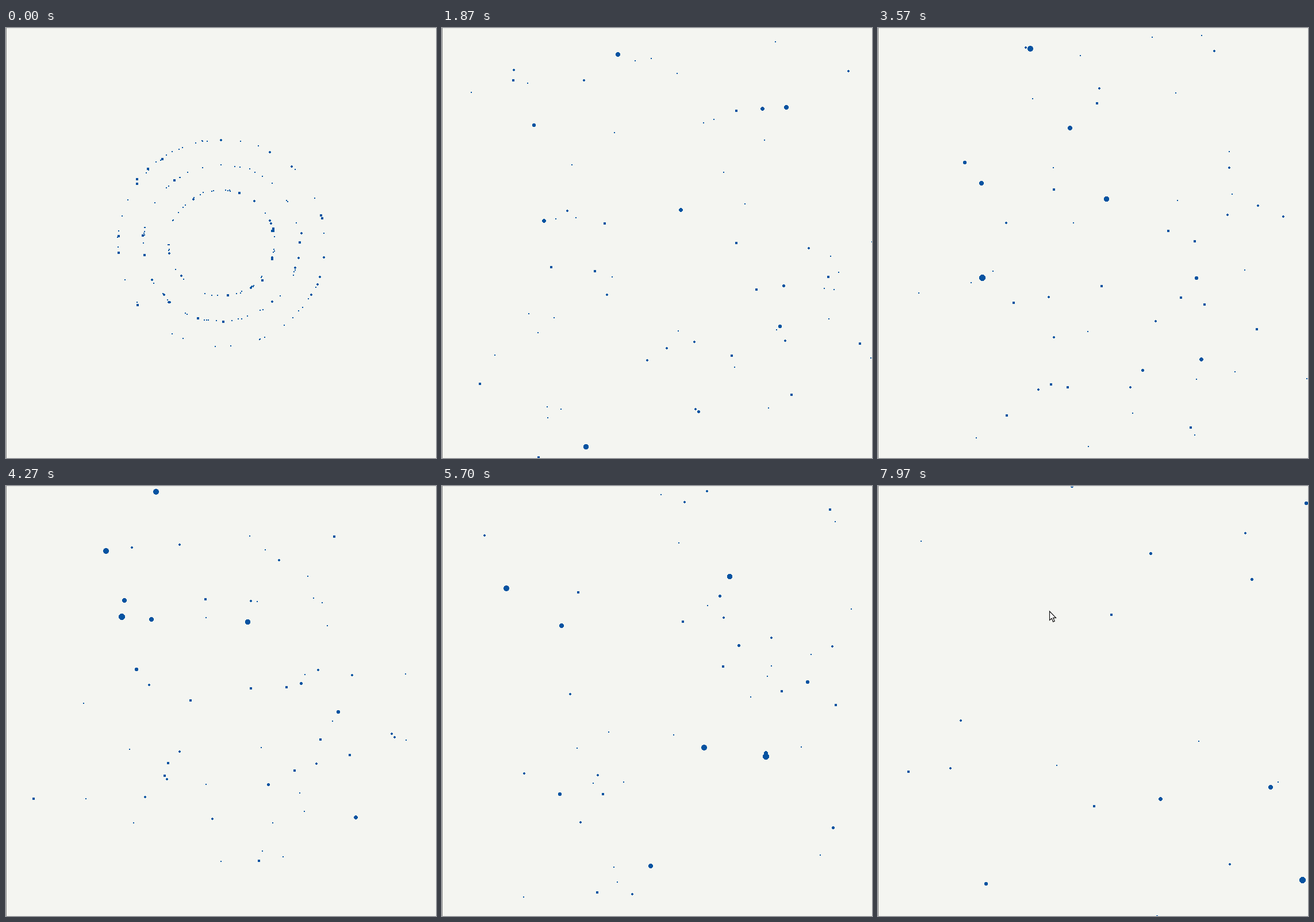
An HTML page with a canvas for the animation above (8000 ms loop, 748x748 px).

```html
<!DOCTYPE html>
<html lang="en">
<head>
<meta charset="utf-8">
<title>Merging particles</title>
<style>
  html, body { margin: 0; width: 100%; height: 100%; overflow: hidden; background: #f4f5f1; }
  canvas { display: block; }
</style>
</head>
<body>
<canvas id="stage" width="748" height="748"></canvas>
<script>
const SIZE = 748, LOOP = 8, CX = 375, CY = 374;
const ctx = document.getElementById('stage').getContext('2d');

// Seconds at which the paths below pass through their points.
const KEYS = [0, 1.03, 2.77, 4.27, 5.07, 6.4, 7.97];
// How far the cloud has spread from the rings at each key.
const SPREAD = [0, 250, 480, 200, 230, 450, 750];
// Heavy bodies, largest first: x and y at each key.
const BODIES = [
  [[283, 292, 205, 201, 400, 704, 738], [477, 689, 675, 228, 322, 618, 685]],
  [[293, 230, 369, 174, 300, 618, 800], [265, 114, 13, 113, 386, 497, 640]],
  [[514, 583, 565, 261, 200, 12, -150], [357, 252, 34, 10, 253, 39, -150]],
  [[463, 449, 387, 420, 462, 541, 600], [402, 279, 360, 237, 275, 5, -200]],
  [[497, 620, 447, 253, 289, 459, 683], [241, 141, 165, 232, 543, 712, 524]],
  [[238, 206, 159, 206, 215, 198, 180], [361, 309, 352, 199, 260, 187, -60]],
  [[463, 637, 520, 608, 571, 555, 492], [476, 503, 536, 577, 373, 590, 545]],
  [[228, 247, 85, 227, 217, 193, 188], [263, 200, 168, 319, 439, 624, 692]],
  [[542, 642, 535, 578, 548, 735, 745], [446, 415, 477, 393, 418, 233, 30]],
  [[446, 436, 459, 457, 443, 510, 338], [439, 642, 644, 520, 338, 63, 1]]
];

let seed = 20;
function random() {
  seed = (seed + 0x6D2B79F5) | 0;
  let r = Math.imul(seed ^ (seed >>> 15), 1 | seed);
  r = (r + Math.imul(r ^ (r >>> 7), 61 | r)) ^ r;
  return ((r ^ (r >>> 14)) >>> 0) / 4294967296;
}
const around = range => (random() * 2 - 1) * range;

// Smooth curve through the values at KEYS.
function curve(values, t) {
  const last = KEYS.length - 1;
  let k = 0;
  while (k < last - 1 && t >= KEYS[k + 1]) k++;
  const slope = i => {
    const a = Math.max(0, i - 1), b = Math.min(last, i + 1);
    return (values[b] - values[a]) / (KEYS[b] - KEYS[a]);
  };
  const span = KEYS[k + 1] - KEYS[k], u = (t - KEYS[k]) / span;
  const u2 = u * u, u3 = u2 * u;
  return (2 * u3 - 3 * u2 + 1) * values[k] + (u3 - 2 * u2 + u) * span * slope(k)
    + (3 * u2 - 2 * u3) * values[k + 1] + (u3 - u2) * span * slope(k + 1);
}

// Sorted from longest to shortest life, so each speck merges into an earlier one.
const COUNT = 155;
const specks = Array.from({ length: COUNT }, (_, i) => {
  const kind = random();
  return {
    radius: 92 + 44 * (i % 3) + around(1.5),
    angle: random() * Math.PI * 2,
    drift: around(0.7),
    spin: around(0.5),
    speed: random(),
    life: (((i + 0.5) / COUNT) ** (-4 / 3) - 1) / 0.8,
    parent: Math.floor(random() * i),
    size: random() < 0.27 ? 4 : 2,
    limit: kind < 0.5 ? 2 : kind < 0.88 ? 4 : kind < 0.95 ? 5 : 6
  };
});

// Crisp disc without soft edges.
function dot(x, y, size, square) {
  const left = Math.round(x - size / 2), top = Math.round(y - size / 2);
  if (square && size === 4) return ctx.fillRect(left, top, 4, 4);
  const odd = size % 2;
  for (let row = 0; row < size; row++) {
    const dy = row + 0.5 - size / 2;
    const half = Math.sqrt(size * size / 4 - dy * dy);
    const width = Math.min(size, 2 * Math.round(half - odd / 2) + odd);
    ctx.fillRect(left + (size - width) / 2, top + row, width, 1);
  }
}

function drawSpecks(t) {
  const spread = curve(SPREAD, t);
  const places = [], merged = new Array(COUNT).fill(0);
  specks.forEach((s, i) => {
    const base = s.angle + s.spin * t, heading = base + s.drift;
    const reach = spread * s.speed;
    let x = CX + s.radius * Math.cos(base) + reach * Math.cos(heading);
    let y = CY + s.radius * Math.sin(base) + reach * Math.sin(heading);
    if (i) {
      const pull = Math.min(1, t / s.life) ** 4, target = places[s.parent];
      x += (target.x - x) * pull;
      y += (target.y - y) * pull;
      if (t >= s.life) merged[s.parent]++;
    }
    places.push({ x, y });
  });
  specks.forEach((s, i) => {
    if (i && t >= s.life) return;
    const grown = Math.min(s.limit, s.size + 2 * merged[i]);
    dot(places[i].x, places[i].y, Math.max(s.size, grown), i % 2);
  });
}

function drawBodies(t) {
  BODIES.forEach(([xs, ys], i) => {
    const full = 11 - 0.65 * i;
    const size = Math.round(4 + (full - 4) * Math.sqrt(Math.min(1, t / 4)));
    dot(curve(xs, t), curve(ys, t), size, i % 2);
  });
}

function drawPointer() {
  const pointer = new Path2D('M298.5 218v15.5l3.6-3.3 2.5 6 2.6-1.1-2.5-5.8h4.8z');
  ctx.fillStyle = '#fff';
  ctx.fill(pointer);
  ctx.strokeStyle = '#111';
  ctx.lineWidth = 1.2;
  ctx.stroke(pointer);
}

function draw(t) {
  ctx.fillStyle = '#f4f5f1';
  ctx.fillRect(0, 0, SIZE, SIZE);
  ctx.fillStyle = '#0653a1';
  drawSpecks(t);
  drawBodies(t);
  ctx.fillStyle = '#e3e4e1';
  ctx.fillRect(0, 0, SIZE, 1);
  ctx.fillStyle = '#858585';
  ctx.fillRect(0, 0, 1, SIZE);
  if (t > 7.6) drawPointer();
}

const start = performance.now();
function tick() {
  draw(((performance.now() - start) / 1000) % LOOP);
  requestAnimationFrame(tick);
}
tick();
</script>
</body>
</html>
```
